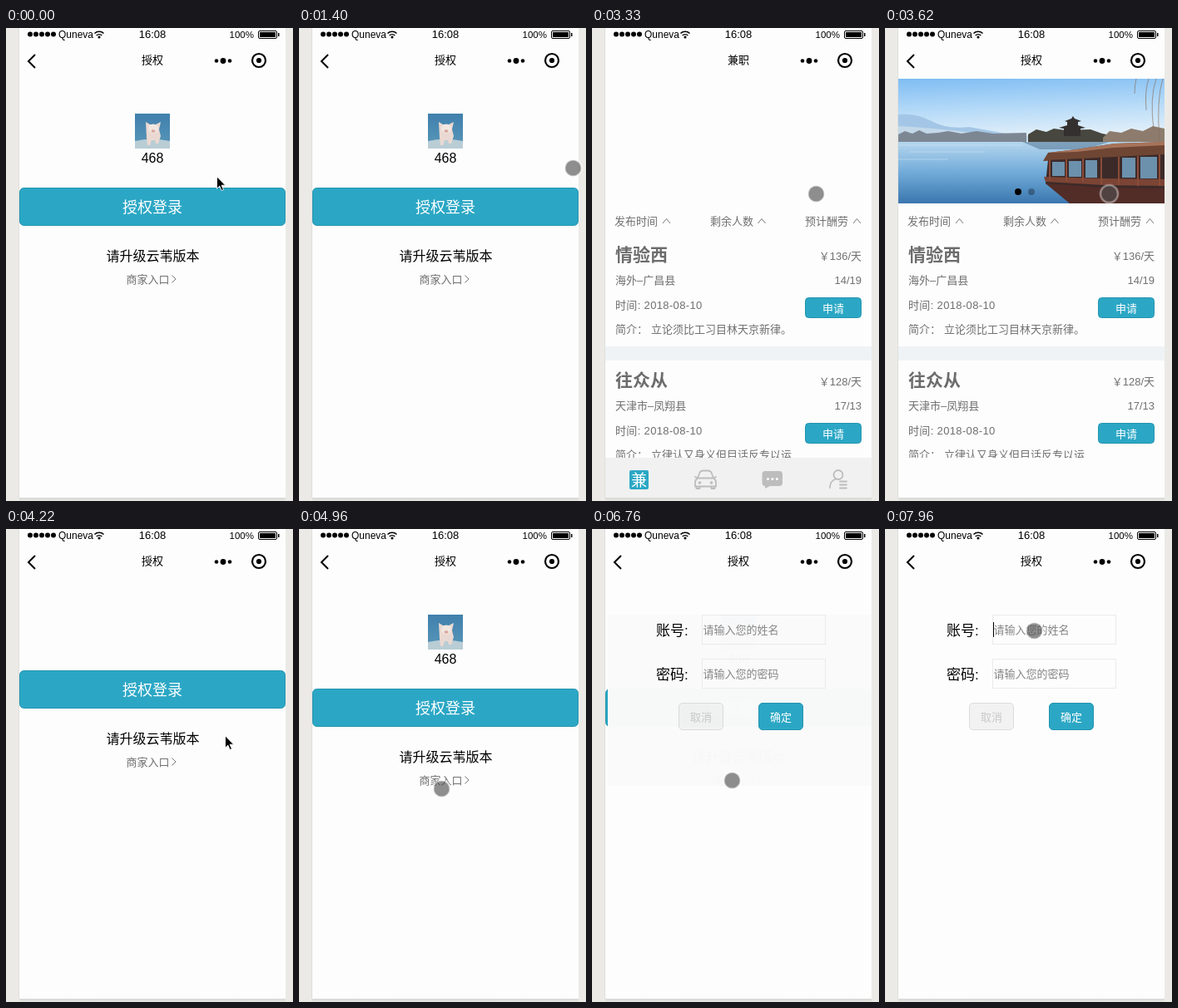
Recreate the animation shown at these times as an HTML page. Size 345 by 569 pixels, loop 8 s.

```html
<!DOCTYPE html>
<html lang="zh-CN">
<head>
<meta charset="utf-8">
<title>授权</title>
<style>
html, body { margin: 0; width: 100%; height: 100%; overflow: hidden; background: #ebeae6; }
svg { display: block; width: 345px; height: 569px; }
text { font: 13px "Liberation Sans", "Noto Sans CJK SC", "Noto Sans CJK", sans-serif; fill: #000; }
.mid { text-anchor: middle; }
.end { text-anchor: end; }
.gray { fill: #707070; }
.white { fill: #fff; font-weight: 500; }
.hint { fill: #858585; }
.head { font-size: 21px; font-weight: 700; fill: #6c6c6c; }
.line { fill: none; stroke: #777; }
.icon { fill: none; stroke: #bdbdbd; stroke-width: 1.8; stroke-linecap: round; stroke-linejoin: round; }
.btn { fill: #2ba7c5; stroke: #2494af; }
.field { fill: none; stroke: #ebebeb; }

.anim { animation: 8s step-end infinite; }
#login { animation-name: login; }
#avatar { animation-name: avatar; }
#back, #titleAuth { animation-name: auth; }
#tabs, #titleJob { animation-name: job; }
#list { animation-name: list; }
#photo { animation-name: photo; }
#dialog { animation-name: dialog; }
#caret { animation-name: caret; }
#cursor { animation-name: cursor; }
#touch { animation-name: touch; }

@keyframes login {
  0% { opacity: 1; transform: none; }
  23% { opacity: 0; }
  50.875% { opacity: 1; transform: translateY(-22px); }
  54.625% { transform: none; }
  86.375%, 100% { opacity: 0; }
}
@keyframes avatar {
  0%, 54.625% { opacity: 1; }
  23%, 86.375%, 100% { opacity: 0; }
}
@keyframes auth { 0%, 45.25% { opacity: 1; } 23% { opacity: 0; } 100% { opacity: 1; } }
@keyframes job { 0%, 45.25%, 100% { opacity: 0; } 23% { opacity: 1; } }
@keyframes list { 0%, 49%, 100% { opacity: 0; } 41.625% { opacity: 1; } }
@keyframes photo { 0%, 49%, 100% { opacity: 0; } 43.5% { opacity: 1; } }
/* slides in from the right while fading, sampled every 150 ms */
@keyframes dialog {
  0% { opacity: 0; transform: translateX(320px); fill: #fafafa; }
  75.125% { opacity: .15; transform: translateX(272px); }
  77% { opacity: .47; transform: translateX(170px); }
  78.875% { opacity: .73; transform: translateX(86px); }
  80.75% { opacity: .87; transform: translateX(41px); }
  82.625% { opacity: .95; transform: translateX(15px); }
  84.5% { opacity: .99; transform: translateX(3px); }
  86.375%, 100% { opacity: 1; transform: none; fill: #fdfdfd; }
}
@keyframes caret { 0% { opacity: 0; } 99.5%, 100% { opacity: 1; } }
@keyframes cursor {
  0% { opacity: 1; transform: translate(253px, 178px); }
  6.25%, 54.625%, 100% { opacity: 0; }
  52.75% { opacity: 1; transform: translate(263px, 248px); }
}
@keyframes touch {
  0% { opacity: 0; transform: translate(329.5px, 168.5px); }
  17.5% { opacity: 1; }
  23% { transform: translate(310px, 174px); }
  24.875% { transform: translate(300.5px, 176.5px); }
  32.375% { transform: translate(285px, 188px); }
  34.125% { transform: translate(269.5px, 199.5px); }
  52.75% { opacity: 0; }
  54.625% { opacity: 1; transform: translate(258.5px, 231.5px); }
  58.25% { transform: translate(222px, 275px); }
  60.125% { transform: translate(190px, 303px); }
  62% { transform: translate(171.5px, 312.5px); }
  67.625% { transform: translate(170px, 307px); }
  69.5% { transform: translate(168.5px, 302.5px); }
  86.375% { transform: translate(169px, 240px); }
  88.25% { transform: translate(169.5px, 186.5px); }
  92% { transform: translate(188.5px, 154px); }
  93.875% { transform: translate(183px, 132px); }
  95.75%, 100% { opacity: 1; transform: translate(179.5px, 122.5px); }
}
</style>
</head>
<body>
<svg viewBox="0 0 345 569">
  <defs>
    <clipPath id="phone"><path d="M16 0h320v565H16z"/></clipPath>
    <clipPath id="scroll"><path d="M16 61h320v456H16z"/></clipPath>
    <clipPath id="banner"><path d="M16 61h320v150H16z"/></clipPath>
    <linearGradient id="shade" x2="0" y2="1">
      <stop stop-color="#d6d6d4"/><stop offset="1" stop-color="#e8e7e4"/>
    </linearGradient>
    <linearGradient id="sky" x2=".15" y2="1">
      <stop stop-color="#7fbdf3"/><stop offset=".55" stop-color="#b9dcf8"/><stop offset="1" stop-color="#e6f1f9"/>
    </linearGradient>
    <linearGradient id="water" x2="0" y2="1">
      <stop stop-color="#b5d6ee"/><stop offset=".5" stop-color="#71abd9"/><stop offset="1" stop-color="#3a76ae"/>
    </linearGradient>
    <linearGradient id="wall" x2="0" y2="1">
      <stop stop-color="#3f80ad"/><stop offset="1" stop-color="#5a97b9"/>
    </linearGradient>
    <path id="up" class="line" d="M-4.500 3L0 -2.500L4.500 3"/>
    <g id="apply">
      <text class="gray" x="28" y="338" letter-spacing=".35">时间: 2018-08-10</text>
      <rect class="btn" x="256.500" y="324.500" width="67" height="24" rx="4"/>
      <text class="white mid" x="290" y="341.500">申请</text>
      <text class="gray" x="28" y="366.500">简介：</text>
    </g>
  </defs>

  <path fill="#dfdfdc" d="M15 0h1v565h-1z"/>
  <path fill="url(#shade)" d="M16 565h320v4H16z"/>
  <path fill="#fdfdfd" d="M16 0h320v565H16z"/>

  <!-- status bar -->
  <path d="M29 7.500h29" stroke="#000" stroke-width="6" stroke-linecap="round" stroke-dasharray="0 7"/>
  <text x="63" y="11.500" style="font-size:12px">Quneva</text>
  <g fill="none" stroke="#000" stroke-width="1.500">
    <path d="M106.500 6.500a7.800 7.800 0 0 1 11 0M108.700 9a4.700 4.700 0 0 1 6.600 0"/>
    <circle cx="112" cy="11" r=".8"/>
  </g>
  <text class="mid" x="176" y="11.500">16:08</text>
  <text class="end" x="298" y="11.500" style="font-size:11.5px">100%</text>
  <rect x="303.500" y="3.500" width="22" height="9" rx="1.500" fill="none" stroke="#000"/>
  <path d="M305 5h19v6h-19zM327 6h1.500v4H327z"/>

  <!-- navigation bar -->
  <path id="back" class="anim" d="M35 32L27 40L35 48" fill="none" stroke="#000" stroke-width="2"/>
  <text id="titleAuth" class="mid anim" x="176" y="42.500">授权</text>
  <text id="titleJob" class="mid anim" x="176" y="42.500">兼职</text>
  <circle cx="253" cy="39.500" r="2.300"/>
  <circle cx="261" cy="39.500" r="3.400"/>
  <circle cx="269" cy="39.500" r="2.300"/>
  <circle cx="304" cy="39" r="8" fill="none" stroke="#000" stroke-width="2.200"/>
  <circle cx="304" cy="39" r="3.100"/>

  <g clip-path="url(#phone)">
    <g id="avatar" class="anim">
      <path fill="url(#wall)" d="M155 103h42v42h-42z"/>
      <path fill="#b9cdd5" d="M155 136q20-5 42 0v9h-42z"/>
      <path fill="#ead9d2" d="M168 113l5 3h7l6-3-2 9 2 8-3 9h-3l-1-4h-4l-2 6h-3l-1-9z"/>
      <ellipse cx="177" cy="121" rx="6" ry="5.500" fill="#f2e7e1"/>
      <ellipse cx="177" cy="124" rx="2.500" ry="1.800" fill="#d8a79c"/>
      <text class="mid" x="176" y="162" style="font-size:16px">468</text>
    </g>

    <g id="login" class="anim">
      <rect class="btn" x="16.500" y="192.500" width="319" height="45" rx="5"/>
      <text class="white mid" x="176" y="221.500" style="font-size:18px">授权登录</text>
      <text class="mid" x="176.500" y="280" style="font-size:16px">请升级云苇版本</text>
      <text class="gray" x="144.500" y="307">商家入口</text>
      <path class="line" d="M199.500 297.500l4.500 4.500l-4.500 4.500"/>
    </g>

    <g id="list" class="anim" clip-path="url(#scroll)">
      <text class="gray" x="27" y="237">发布时间</text><use href="#up" x="89.500" y="232"/>
      <text class="gray" x="142" y="237">剩余人数</text><use href="#up" x="204" y="232"/>
      <text class="gray" x="256" y="237">预计酬劳</text><use href="#up" x="318.500" y="232"/>

      <text class="head" x="28" y="279.500">情验西</text>
      <text class="gray end" x="324" y="279">￥136/天</text>
      <text class="gray" x="28" y="308">海外–广昌县</text>
      <text class="gray end" x="324" y="308">14/19</text>
      <use href="#apply"/>
      <text class="gray" x="71" y="366.500">立论须比工习目林天京新律。</text>

      <path fill="#eff3f6" d="M16 383h320v17H16z"/>

      <text class="head" x="28" y="430.500">往众从</text>
      <text class="gray end" x="324" y="430">￥128/天</text>
      <text class="gray" x="28" y="459">天津市–凤翔县</text>
      <text class="gray end" x="324" y="459">17/13</text>
      <use href="#apply" y="151"/>
      <text class="gray" x="71" y="517.500">立律认又身义但目话反专以运</text>
    </g>

    <g id="photo" class="anim" clip-path="url(#banner)">
      <path fill="url(#sky)" d="M16 61h320v76H16z"/>
      <path fill="#a4c6e6" d="M16 104q22-2 40 8t45 7l50 9v6H16z"/>
      <path fill="#c3d9ea" d="M16 118q40 2 90 8l70 4v6H16z"/>
      <path fill="#7d8794" d="M16 128l8-4 9 3 8-4 9 4 14-1 12-2 16 3 18-3 20 3 40-1v11H16z"/>
      <path fill="#47463f" d="M172 128l10-6 12 3 9-4 14 2 30-1 14 5 10 2v8h-99z"/>
      <path fill="#353030" d="M216 112l8-3 2-3 2 3 8 3-4 1v4l9 3-6 1v9h-20v-9l-6-1 10-3v-4z"/>
      <path fill="#8d7c6d" d="M262 132l8-8 14 2 12-5 14 3 12-6 14 3v16h-74z"/>
      <path fill="url(#water)" d="M16 137h320v74H16z"/>
      <path fill="#5d7f9c" opacity=".6" d="M165 137h105l-30 9h-54z"/>
      <path stroke="#d3e7f6" opacity=".5" d="M16 141h150M30 149h90M16 158h60"/>
      <path fill="#6f4634" d="M190 160l6-10 34-4 46-7 60-2v16l-60 3z"/>
      <path fill="#a7735a" d="M196 150l34-4 46-7 60-2v4l-62 3-44 5z"/>
      <path fill="#3c2a29" d="M196 159l80-4 60-3v59H228l-35-24z"/>
      <path fill="#6c91ac" d="M201 161h15v17h-15zM221 160h15v19h-15zM241 159h14v21h-14zM285 156h16v24h-16zM307 155h20v26h-20z"/>
      <path fill="#7b4434" d="M191 179l72 2 73 1v8l-73-1-70-4z"/>
      <path fill="#522c27" d="M193 187l70 5 73 1v18H222z"/>
      <path stroke="#8c4b38" stroke-width="2" d="M198 159v24M218 158v26M238 157v28M260 156v32M281 155v34M304 154v36M330 152v38"/>
      <path fill="none" stroke="#866d5c" opacity=".65" d="M334 61q-8 25-4 74M326 61q-8 22-3 62M317 61q-5 14-3 38M302 61q-2 8-2 18"/>
      <circle cx="160" cy="197" r="4"/>
      <circle cx="176" cy="197" r="4" opacity=".3"/>
    </g>

    <g id="tabs" class="anim">
      <path fill="#f1f1f1" d="M16 517h320v48H16z"/>
      <rect x="45" y="532" width="23" height="23" rx="2" fill="#2ba7c5"/>
      <text class="white mid" x="56.500" y="550.500" style="font-size:19px">兼</text>
      <path class="icon" d="M127 541l2.500-6q1-2.500 4-2.500h6q3 0 4 2.500l2.500 6M124 540l3 1.500h19l3-1.500M127 541.500q-3 2-3 5v5h25v-5q0-3-3-5M125.500 551.500v2.500h4v-2.500M143.500 551.500v2.500h4v-2.500"/>
      <g fill="#bdbdbd">
        <circle cx="129.500" cy="547" r="1.800"/><circle cx="143.500" cy="547" r="1.800"/>
        <path d="M208 533h17q4 0 4 4v10q0 4-4 4h-11l-6 3v-3q-3.500 0-3.500-4v-10q0-4 3.500-4z"/>
      </g>
      <path d="M211.500 542.500h11" stroke="#fff" stroke-width="3" stroke-linecap="round" stroke-dasharray="0 5.400"/>
      <circle class="icon" cx="296" cy="537.500" r="5.500"/>
      <path class="icon" d="M286 553q0-8 7-10.500M298 545.500h8M298 549.500h8M298 553.500h8"/>
    </g>

    <g id="dialog" class="anim">
      <path d="M16 103h320v206H16z"/>
      <text x="74" y="127.500" style="font-size:17px">账号:</text>
      <rect class="field" x="129.500" y="103.500" width="148" height="35"/>
      <text class="hint" x="130.500" y="126">请输入您的姓名</text>
      <text x="74" y="180.500" style="font-size:17px">密码:</text>
      <rect class="field" x="129.500" y="156.500" width="148" height="35"/>
      <text class="hint" x="130.500" y="179">请输入您的密码</text>
      <rect x="101.500" y="209.500" width="53" height="32" rx="4.500" fill="#f2f2f2" stroke="#dcdcdc"/>
      <text class="mid" x="128" y="230.500" style="fill:#c8c8c8">取消</text>
      <rect class="btn" x="197.500" y="209.500" width="53" height="32" rx="4.500"/>
      <text class="white mid" x="224" y="230.500">确定</text>
    </g>
    <path id="caret" class="anim" d="M130 112h1v18h-1z"/>
  </g>

  <path id="cursor" class="anim" d="M.5 .8v14.400l3.300-3.100 2.400 5.400 2.300-1-2.400-5.300h4.600z" stroke="#fff" stroke-width=".9"/>
  <g id="touch" class="anim">
    <circle r="9.500" fill="#505050" opacity=".64"/>
    <circle r="10.500" fill="none" stroke="#fff" stroke-width="2" opacity=".5"/>
  </g>
</svg>
</body>
</html>
```
